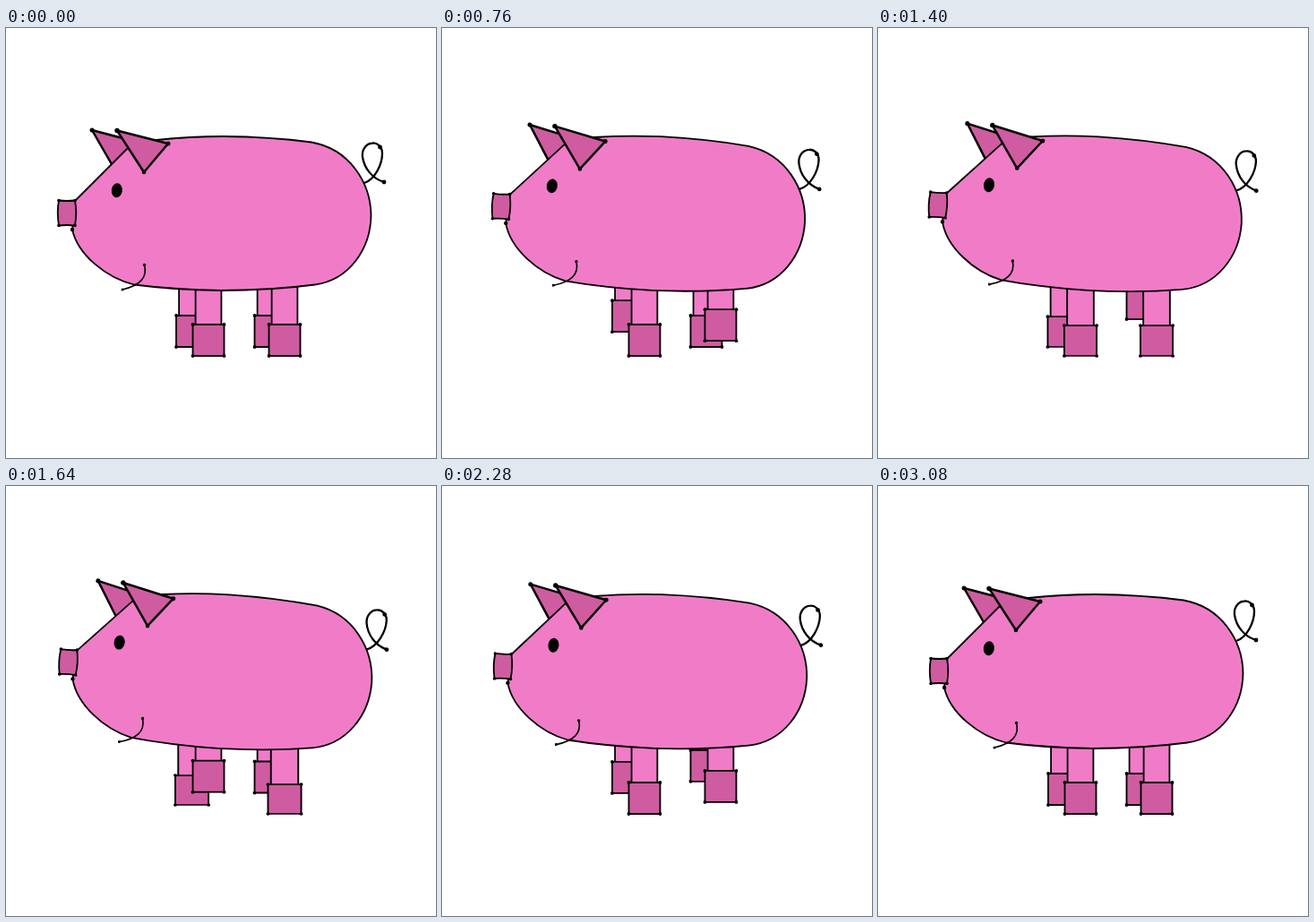
Animation, 480 px wide and 480 px high, one loop 3.6 s. Source, as an HTML page:

```html
<!DOCTYPE html>
<html lang="en">
<head>
<meta charset="utf-8">
<title>Dancing pig</title>
<style>
  html, body { margin: 0; width: 100%; height: 100%; overflow: hidden; background: #fff; }
  svg { display: block; width: 100vw; height: 100vh; }
  .skin { fill: #f07cc7; }
  .dark { fill: #cf5ca0; }
  .skin, .dark, .line { stroke: #000; stroke-width: 1.8; stroke-linejoin: round; stroke-linecap: round; }
  .line { fill: none; }
  .ear { stroke-width: 2.5; }
  .smile { stroke-width: 1.6; }
  .tail { stroke-width: 2.3; }
</style>
</head>
<body>
<svg viewBox="0 0 480 480">
  <defs>
    <g id="leg">
      <rect class="skin" x="-14.4" y="-90" width="28.8" height="56"/>
      <rect class="dark" x="-17.5" y="-35" width="35" height="35"/>
      <circle cx="-17.5" cy="-35" r="1.9"/>
      <circle cx="17.5" cy="-35" r="1.9"/>
      <circle cx="-17.5" r="1.9"/>
      <circle cx="17.5" r="1.9"/>
    </g>
  </defs>
  <use id="farFront" href="#leg"/>
  <use id="farBack" href="#leg"/>
  <use id="nearFront" href="#leg"/>
  <use id="nearBack" href="#leg"/>
  <g id="body">
    <path class="dark ear" d="M96 114L153 129L126 166Z"/>
    <circle cx="96" cy="114" r="2.5"/>
    <path class="skin" d="M77 193L135 135Q147 127 168 125Q205 121 243 121Q295 121.5 341 127.5C383 135 407 172 407.5 209C407 247 383 281 345 286.5Q295 293 240 293Q185 292 143 286.5C112 279 80 253 74 225Z"/>
    <circle cx="74" cy="225" r="2.2"/>
    <path class="dark" d="M59 192.5Q68 193.5 77 192.5Q79.5 206 77 220.5Q68 219.5 59 220.5Q56.5 206 59 192.5Z"/>
    <circle cx="59" cy="192.5" r="1.8"/>
    <circle cx="77" cy="192.5" r="1.8"/>
    <circle cx="59" cy="220.5" r="1.8"/>
    <circle cx="77" cy="220.5" r="1.8"/>
    <path class="dark ear" d="M124 114.5L181 129L154 161Z"/>
    <circle cx="124" cy="114.5" r="2.7"/>
    <circle cx="181" cy="129" r="2.5"/>
    <circle cx="154" cy="161" r="2.3"/>
    <ellipse cx="123.8" cy="181.3" rx="6" ry="8" transform="rotate(6 124 181)"/>
    <path class="line smile" d="M130 292Q160 285 154.5 264.5"/>
    <circle cx="130" cy="292" r="1.5"/>
    <circle cx="154.5" cy="264.5" r="1.7"/>
    <path class="line tail" d="M400 173C412 169 420 152 420 140C420 132 414 128 409 128.5C401 129 397 137 398 144C400 157 409 168 422 172"/>
    <circle cx="417.5" cy="133" r="2.4"/>
    <circle cx="422" cy="172" r="2.4"/>
  </g>
</svg>
<script>
  // Times below are in steps of 40 ms; the body nods once per beat.
  const LOOP = 3600, STEP = 40, BEAT = 7, BAR = 2 * BEAT;
  const NOD_START = 3, NOD_END = 73;

  const legs = [
    { id: 'farFront', x: 207.5, y: 356, start: .35, every: BAR, length: 5.5, height: 36 },
    { id: 'farBack', x: 295, y: 356, start: 5.5, every: BEAT, length: 3.6, height: 32 },
    { id: 'nearFront', x: 226, y: 366, start: 8.8, every: BAR, length: 5.5, height: 36 },
    { id: 'nearBack', x: 311, y: 366, start: .35, every: BAR, length: 5.5, height: 36 }
  ];
  for (const leg of legs) leg.node = document.getElementById(leg.id);
  const body = document.getElementById('body');

  const turn = part => part * 2 * Math.PI;

  function hop(leg, step) {
    const t = (step - leg.start) % leg.every;
    if (t < 0 || t > leg.length || step - t > NOD_END) return 0;
    return leg.height * Math.sin(Math.PI * t / leg.length);
  }

  function pose(step) {
    const nodding = step >= NOD_START && step < NOD_END;
    const angle = nodding ? 1.75 + 1.6 * Math.cos(turn((step - 6.25) / BEAT)) : 0;
    const sway = nodding ? -.35 - 1.8 * Math.sin(turn((step - 1.3) / BAR)) : 0;
    body.setAttribute('transform', `translate(${sway} 0) rotate(${angle} 240 207)`);

    // Planted legs give way as the body tilts.
    const press = Math.max(0, angle - 2.65) * .09;
    for (const leg of legs) {
      const lift = hop(leg, step);
      const squash = lift ? 0 : press;
      leg.node.setAttribute('transform',
        `translate(${leg.x} ${leg.y - lift}) scale(${1 + squash} ${1 - squash})`);
    }
  }

  const begin = performance.now();
  function draw() {
    pose(Math.floor((performance.now() - begin) % LOOP / STEP));
    requestAnimationFrame(draw);
  }
  draw();
</script>
</body>
</html>
```
